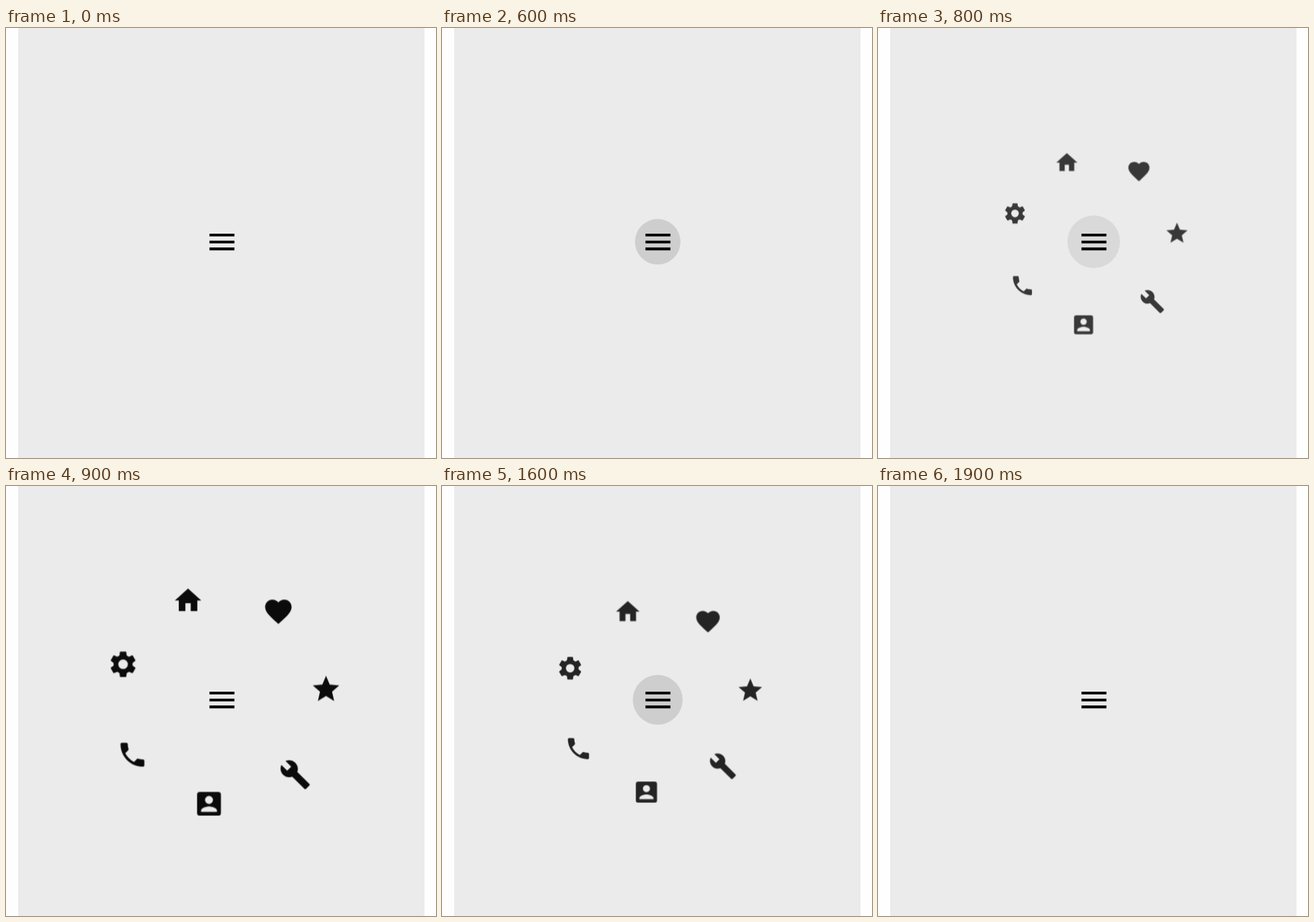
An HTML page for the animation above (2 s loop, 600x600 px).

```html
<!DOCTYPE html>
<html lang="en">
<head>
<meta charset="utf-8">
<title>Radial menu</title>
<style>
  html, body { margin: 0; height: 100%; overflow: hidden; background: #fefefe; }
  svg { display: block; width: 100vw; height: 100vh; }
</style>
</head>
<body>
<svg viewBox="0 0 600 600">
  <defs>
    <path id="tooth" d="M9.25 6.5V5.35L9.61 2.81c.04-.24.23-.41.47-.41h3.84c.24 0 .44.17.48.41l.35 2.54V6.5z"/>
  </defs>
  <rect x="17" width="567" height="600" fill="#ebebeb"/>
  <circle id="ripple" cx="301" cy="298.3"/>
  <g id="items">
    <path d="M10 20v-6h4v6h5v-8h3L12 3 2 12h3v8z"/>
    <path d="M12 21.35l-1.45-1.32C5.4 15.36 2 12.28 2 8.5 2 5.42 4.42 3 7.5 3c1.74 0 3.41.81 4.5 2.09C13.09 3.81 14.76 3 16.5 3 19.58 3 22 5.42 22 8.5c0 3.78-3.4 6.86-8.55 11.54z"/>
    <path d="M12 17.27L18.18 21l-1.64-7.03L22 9.24l-7.19-.61L12 2 9.19 8.63 2 9.24l5.46 4.73L5.82 21z"/>
    <path d="M22.7 19l-9.1-9.1c.9-2.3.4-5-1.5-6.9-2-2-5-2.4-7.4-1.3L9 6 6 9 1.6 4.7C.4 7.1.9 10.1 2.9 12.1c1.9 1.9 4.6 2.4 6.9 1.5l9.1 9.1c.4.4 1 .4 1.4 0l2.3-2.3c.5-.4.5-1.1.1-1.4z"/>
    <path fill-rule="evenodd" d="M3 5v14a2 2 0 0 0 2 2h14a2 2 0 0 0 2-2V5a2 2 0 0 0-2-2H5a2 2 0 0 0-2 2zm12 4a3 3 0 0 1-6 0 3 3 0 0 1 6 0zm-9 8c0-2 4-3.1 6-3.1s6 1.1 6 3.1v1H6z"/>
    <path d="M6.62 10.79c1.44 2.83 3.76 5.14 6.59 6.59l2.2-2.2c.27-.27.67-.36 1.02-.24 1.12.37 2.33.57 3.57.57.55 0 1 .45 1 1V20c0 .55-.45 1-1 1-9.39 0-17-7.61-17-17 0-.55.45-1 1-1h3.5c.55 0 1 .45 1 1 0 1.25.2 2.45.57 3.57.11.35.03.74-.25 1.02z"/>
    <g>
      <circle cx="12" cy="12" r="5.4" fill="none" stroke="#000" stroke-width="3.6"/>
      <use href="#tooth"/>
      <use href="#tooth" transform="rotate(60 12 12)"/>
      <use href="#tooth" transform="rotate(120 12 12)"/>
      <use href="#tooth" transform="rotate(180 12 12)"/>
      <use href="#tooth" transform="rotate(240 12 12)"/>
      <use href="#tooth" transform="rotate(300 12 12)"/>
    </g>
  </g>
  <path transform="translate(301.3 298.6) scale(1.935) translate(-12 -12)" d="M3 6h18v2H3zm0 5h18v2H3zm0 5h18v2H3z"/>
</svg>
<script>
const LOOP = 2000, STEP = 100;
const OPEN = 604, CLOSE = 1516, DURATION = 400;
const PRESSES = [504, 1468];
const RADIUS = 153.1, FIRST_ANGLE = -108.75;

const items = document.getElementById('items');
const ripple = document.getElementById('ripple');
const clamp = x => Math.min(1, Math.max(0, x));

// cubic-bezier(.4, 0, .2, 1)
function ease(x) {
  x = clamp(x);
  let lo = 0, hi = 1;
  for (let i = 0; i < 30; i++) {
    const u = (lo + hi) / 2, v = 1 - u;
    if (1.2 * u * v * v + 0.6 * u * u * v + u ** 3 < x) lo = u; else hi = u;
  }
  return lo * lo * (3 - 2 * lo);
}

[...items.children].forEach((icon, i, all) => {
  const a = (FIRST_ANGLE + i * 360 / all.length) * Math.PI / 180;
  icon.setAttribute('transform',
    `translate(${RADIUS * Math.cos(a)} ${RADIUS * Math.sin(a)}) scale(1.935) translate(-12 -12)`);
});

function draw(t) {
  const open = ease((t - OPEN) / DURATION) - ease((t - CLOSE) / DURATION);
  items.setAttribute('transform', `translate(301 298.3) scale(${open})`);
  items.setAttribute('opacity', open);
  items.setAttribute('visibility', open > 0.005 ? 'visible' : 'hidden');

  const age = t - (t < PRESSES[1] ? PRESSES[0] : PRESSES[1]);
  const alpha = age < 75 ? 0 : 0.124 * clamp(1 - (age - 246) / 140);
  ripple.setAttribute('r', 22 + 14.7 * ease(age / 225));
  ripple.setAttribute('fill-opacity', alpha);
}

// The motion advances ten times a second.
function tick() {
  draw(Math.floor(performance.now() % LOOP / STEP) * STEP);
  requestAnimationFrame(tick);
}
tick();
</script>
</body>
</html>
```
